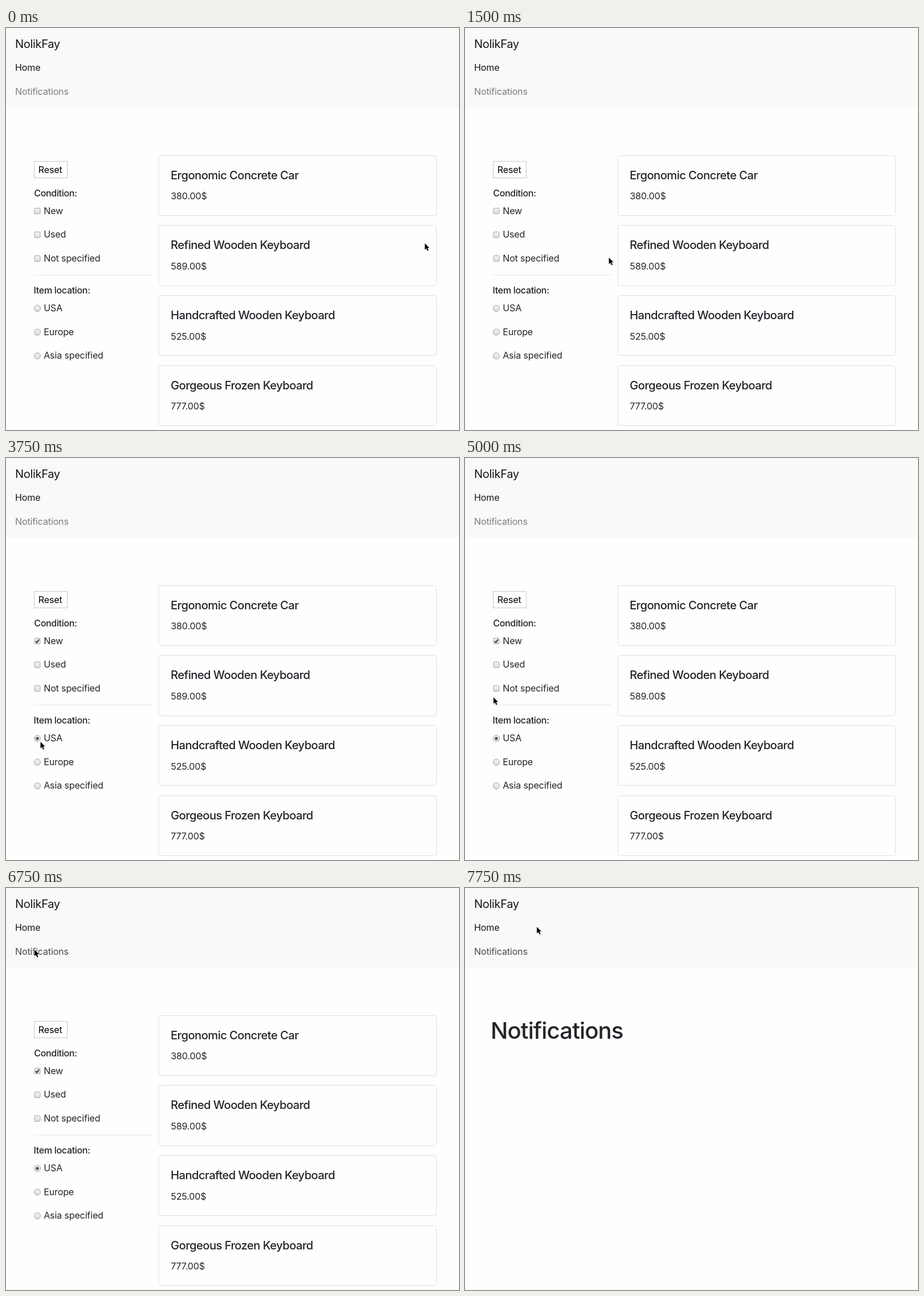
An HTML page for the animation above (8 s loop, 795x704 px).

```html
<!DOCTYPE html>
<html lang="en">
<head>
<meta charset="utf-8">
<title>Shop filters</title>
<style>
html, body { margin: 0; width: 100%; height: 100%; overflow: hidden; background: #fefefe; }
svg { display: block; width: 795px; height: 704px; }
text {
  font: 400 16.1px Inter, "Open Sans", sans-serif;
  font-optical-sizing: none;
  letter-spacing: -.17px;
  fill: #212529;
}
.brand { font-size: 20.2px; letter-spacing: -.4px; fill: #17181a; }
.home { fill: #17181a; }
.label { font-weight: 500; letter-spacing: -.36px; }
.title { font-size: 20.2px; font-weight: 500; letter-spacing: -.56px; }
.heading { font-size: 40.2px; font-weight: 500; letter-spacing: -.9px; }
.card { fill: none; stroke: #dfdfdf; }
.box { fill: url(#shade); stroke: #a3a3a3; }
.check { fill: none; stroke: #3c3c3c; stroke-width: 2; }
.dot { fill: #4c4c4c; }
.cursor { fill: #000; stroke: #fff; stroke-width: 1.6; paint-order: stroke; stroke-linejoin: round; }

.link, .check, .dot, .shop, .notes { animation: 8s step-end infinite; }
.link { animation-name: hover; }
.check { animation-name: tick; }
.dot { animation-name: pick; }
.shop { animation-name: leave; }
.notes { animation-name: enter; }
.cursor { animation: move 8s infinite; }

@keyframes hover { 0% { fill: #7c7d7d; } 78.125%, 100% { fill: #4a4b4b; } }
@keyframes tick { 0% { opacity: 0; } 28.125%, 100% { opacity: 1; } }
@keyframes pick { 0% { opacity: 0; } 43.75%, 100% { opacity: 1; } }
@keyframes leave { 0% { opacity: 1; } 87.5%, 100% { opacity: 0; } }
@keyframes enter { 0% { opacity: 0; } 87.5%, 100% { opacity: 1; } }

/* The pointer is sampled every 250 ms */
@keyframes move {
  0%, 12.5% { transform: translate(735px, 377px); animation-timing-function: steps(1); }
  15.625% { transform: translate(767px, 391px); animation-timing-function: steps(1); }
  18.75% { transform: translate(252.5px, 402px); animation-timing-function: steps(3); }
  28.125%, 34.375% { transform: translate(52.5px, 322px); animation-timing-function: steps(3); }
  43.75%, 50% { transform: translate(60.5px, 497px); animation-timing-function: steps(4); }
  62.5% { transform: translate(50px, 419px); animation-timing-function: steps(3); }
  71.875% { transform: translate(92px, 62px); animation-timing-function: steps(2); }
  78.125%, 87.5% { transform: translate(50px, 108px); animation-timing-function: steps(2); }
  93.75% { transform: translate(173px, 117px); animation-timing-function: steps(1); }
  96.875%, 100% { transform: translate(126px, 68px); }
}
</style>
</head>
<body>
<svg viewBox="0 0 795 704">
  <defs>
    <linearGradient id="shade" x2="0" y2="1">
      <stop stop-color="#f3f3f3"/>
      <stop offset="1" stop-color="#dcdcdc"/>
    </linearGradient>
  </defs>

  <rect width="795" height="139.5" fill="#f8f9f9"/>
  <text class="brand" x="16" y="35">NolikFay</text>
  <text class="home" x="16" y="75">Home</text>
  <text class="link" x="16" y="116.5">Notifications</text>

  <g class="shop">
    <rect x="49.5" y="233.5" width="58" height="29" fill="#fff" stroke="#c8c8c8"/>
    <text x="56.8" y="254" style="fill:#000">Reset</text>
    <text class="label" x="49.2" y="294.8">Condition:</text>
    <path d="M49 432.5H257" stroke="#e6e6e6"/>
    <text class="label" x="48.6" y="465.2">Item location:</text>
    <g id="options"></g>
    <path class="check" d="M52 320.8l2.2 2.4 4-5.6"/>
    <circle class="dot" cx="55" cy="491" r="2.6"/>
    <g id="cards"></g>
  </g>

  <text class="notes heading" x="45" y="263.5">Notifications</text>
  <path class="cursor" d="M0 0V11.4L2.6 9L4.5 13.4L6.5 12.5L4.6 8.3H8.1Z"/>
</svg>
<script>
const fill = (id, items, draw) => {
  document.getElementById(id).innerHTML = items.map(draw).join('');
};

const options = ['New', 'Used', 'Not specified', 'USA', 'Europe', 'Asia specified'];
fill('options', options, (name, i) => {
  const radio = i > 2;
  const y = (radio ? 491 : 320.5) + (i % 3) * 41.6;
  const size = radio ? 11 : 10;
  return `<rect class="box" x="${55 - size / 2}" y="${y - size / 2}" width="${size}" height="${size}" rx="${radio ? 5.5 : 1.5}"/>
    <text x="66.2" y="${y + 5}">${name}</text>`;
});

const goods = [
  ['Ergonomic Concrete Car', 380],
  ['Refined Wooden Keyboard', 589],
  ['Handcrafted Wooden Keyboard', 525],
  ['Gorgeous Frozen Keyboard', 777],
];
fill('cards', goods, ([name, price], i) => {
  const y = 122.6 * i;
  const top = Math.floor(y + .3) + 223.5;
  const bottom = Math.round(y) + 328.5;
  return `<rect class="card" x="268" y="${top}" width="487.5" height="${bottom - top}" rx="4"/>
    <text class="title" x="289" y="${y + 264.7}">${name}</text>
    <text x="289.3" y="${y + 300.3}">${price}.00$</text>`;
});
</script>
</body>
</html>
```
